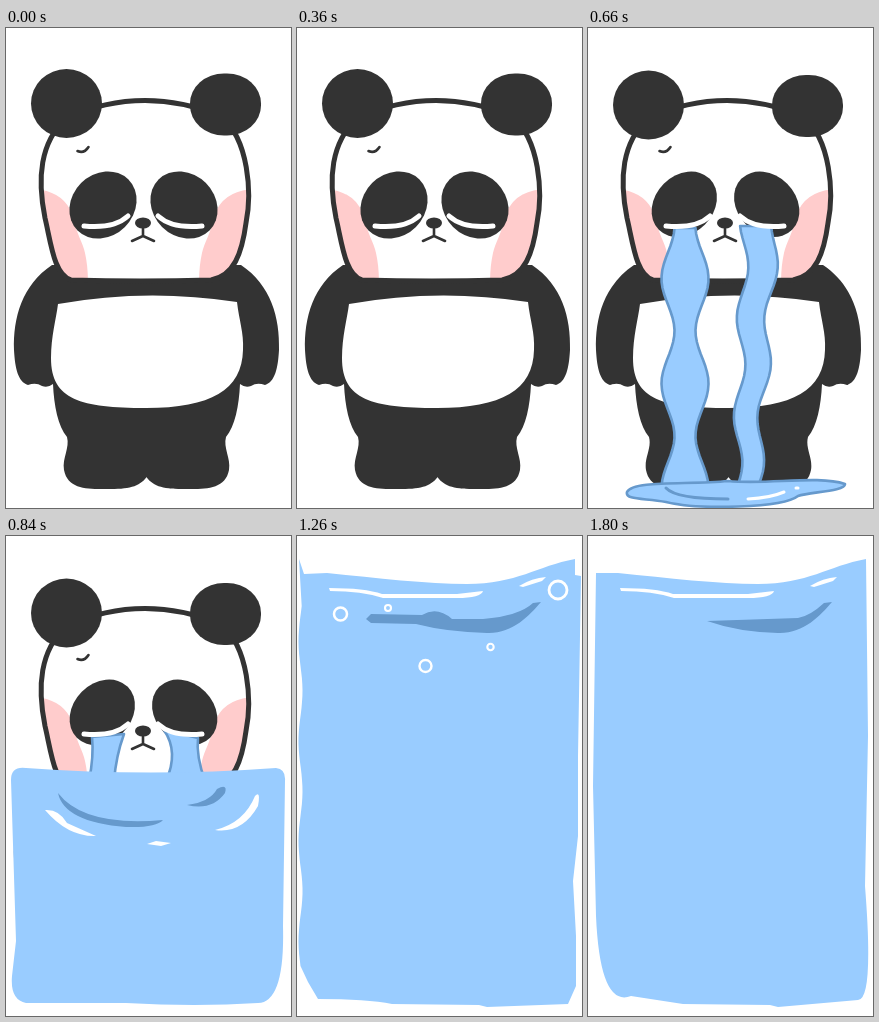
Animation of 285x480 px, one loop 1.86 s. Source, as an HTML page:

```html
<!DOCTYPE html>
<html lang="en">
<head>
<meta charset="utf-8">
<title>Crying panda</title>
<style>
  html, body { margin: 0; width: 100%; height: 100%; overflow: hidden; background: #fff; }
  svg { display: block; width: 100vw; height: 100vh; }
  .ink { fill: #333; }
  .pink { fill: #fcc; }
  .white { fill: #fff; }
  .blue { fill: #9cf; }
  .deep { fill: #69c; }
  .line { fill: none; stroke: #333; stroke-width: 2.6; stroke-linecap: round; stroke-linejoin: round; }
  .lid { fill: none; stroke: #fff; stroke-width: 5; stroke-linecap: round; }
  .wet { fill: #9cf; stroke: #69c; stroke-width: 2.6; stroke-linejoin: round; }
  .glint { fill: none; stroke: #fff; stroke-width: 3; stroke-linecap: round; }
</style>
</head>
<body>
<svg viewBox="0 0 285 480">
  <defs>
    <path id="skull" d="M60 90Q136 56 215 88C243 112 246 165 240 195C236 225 228 248 205 252Q135 254 65 252C48 247 45 215 39 190C31 150 34 115 60 90Z"/>
    <clipPath id="inHead"><use href="#skull"/></clipPath>
    <clipPath id="fall"><rect id="fallBox" width="285" height="480"/></clipPath>
    <path id="halfBody" class="ink" d="M142 237H46C16 257 7 290 8 322C9 340 12 354 22 357Q30 354 36 358Q42 360 47 356C48 378 52 398 61 409C64 420 56 430 58 442C62 463 85 461 105 461C125 461 135 458 142 447Z"/>
    <path id="cheek" class="pink" d="M30 161Q58 164 66 186C70 205 77 215 79 225Q82 238 82 256H30Z"/>
    <ellipse id="patch" class="ink" cx="97" rx="36" transform="rotate(-45 97 177)"/>
    <path id="lid" class="lid" d="M78 198Q108 201 122 188"/>
  </defs>

  <g id="panda">
    <use href="#halfBody"/>
    <use href="#halfBody" transform="translate(281) scale(-1 1)"/>
    <path class="white" d="M52 276Q140 260 231 274C233 292 238 305 237 322C236 362 205 380 140 380C75 380 45 372 45 330C45 308 50 292 52 276Z"/>
    <use href="#skull" class="white"/>
    <g clip-path="url(#inHead)">
      <use href="#cheek"/>
      <use href="#cheek" transform="translate(275) scale(-1 1)"/>
    </g>
    <use href="#skull" fill="none" stroke="#333" stroke-width="5"/>
    <g id="ears" class="ink">
      <ellipse cx="60.5" cy="75.5" rx="35.5" ry="34.5"/>
      <rect x="184" y="45.5" width="71" height="62" rx="34" ry="30"/>
    </g>
    <use href="#patch"/>
    <use href="#patch" transform="translate(275) scale(-1 1)"/>
    <path class="line" d="M71.5 123Q78 126 82.5 119M137 198V208M126 213L137 208L148 213"/>
    <ellipse class="ink" cx="137" cy="195" rx="8" ry="5.5"/>
  </g>

  <g id="tears" clip-path="url(#fall)">
    <path id="tearLeft" class="wet"/>
    <path id="tearRight" class="wet"/>
  </g>
  <g id="lids">
    <use href="#lid"/>
    <use href="#lid" transform="translate(274) scale(-1 1)"/>
  </g>

  <g id="puddle">
    <path class="wet" d="M39 464C45 452 100 457 140 453C180 457 230 447 257 456C258 463 222 464 210 468C195 480 110 482 78 474C55 470 37 472 39 464Z"/>
    <path fill="none" stroke="#69c" stroke-width="3" stroke-linecap="round" d="M78 460Q88 471 140 471"/>
    <path class="glint" d="M160 471Q182 470 196 464M208 460h2"/>
  </g>

  <g id="rising">
    <path id="pool" class="blue"/>
    <g id="ripples">
      <path class="deep" d="M52 257Q78 291 157 284Q150 292 120 291Q58 286 52 257ZM181 269Q204 266 211 253Q222 247 219 257Q206 275 181 269Z"/>
      <path class="white" d="M39 274Q53 273 61 287L90 300Q62 301 39 274ZM209 294Q238 287 249 260Q255 254 252 270Q236 298 209 294ZM141 308L150 305L165 307L155 310Z"/>
    </g>
  </g>

  <g id="full">
    <path id="sea" class="blue"/>
    <path id="shade" class="deep"/>
    <path class="white" d="M32 52Q68 52 85 58H160L186 55Q184 62 160 62H86Q65 55 33 55ZM222 50Q235 42 249 41L245 45L226 51Z"/>
    <g id="bubbles" fill="none" stroke="#fff"></g>
  </g>
</svg>
<script>
const $ = id => document.getElementById(id);
const draw = (id, d) => $(id).setAttribute('d', d);
const show = (id, on) => $(id).style.display = on ? '' : 'none';
const wave = (y, start, period) => Math.cos(2 * Math.PI * (y - start) / period);

const STEP = 60, STEPS = 31;
const CRY = 10, RISE = 12, WADE = 14, FULL = 17, BUBBLE = 19;

// Points of an edge x(y), sampled downwards or upwards.
function edge(x, from, to) {
  const points = [], dir = Math.sign(to - from);
  for (let y = from; (to - y) * dir >= 0; y += 6 * dir) points.push(`${x(y).toFixed(1)} ${y}`);
  return points.join('L');
}

function stream(top, middle, half) {
  const bottom = top + 258;
  return `M${edge(y => middle(y) - half(y), top, bottom)}L${edge(y => middle(y) + half(y), bottom, top)}Z`;
}

const tall = [
  stream(200, () => 97, y => 17 - 6.5 * wave(y, 198, 105)),
  stream(198, y => 172 - (y - 200) / 20 + 5 * wave(y, 240, 98), y => 15.5 - (y - 200) / 50)
];
const short = [
  'M86 201Q88 220 83 245H108Q110 220 118 198Z',
  'M158 194Q173 216 160 245H199Q190 220 192 202Z'
];

const pool = y => `M5 ${y + 12}Q5 ${y - 2} 20 ${y}Q145 ${y + 9} 270 ${y}Q280 ${y + 1} 279 ${y + 13}` +
  'L277 390Q279 466 252 467Q190 471 120 467H20Q4 464 6 440L10 405Z';

function sea(rough) {
  const top = 'L30 37C80 42 130 48 170 48C220 48 240 30 278 23';
  const bottom = 'L190 471L182 469L95 468';
  return rough
    ? `M2 23L7 38${top}V39L284 40L281 220V300L276 345L279 400V450L271 468${bottom}Q70 463 21 463L11 446` +
      `L${edge(y => 3.5 - 2 * wave(y, 205, 100), 430, 70)}Z`
    : `M8 37${top}L280 200L277 350Q286 464 270 464${bottom}L43 460Q12 472 8 380L5 250Z`;
}

function shade(rough) {
  const tail = rough ? 'M119 88L74 87L69 83L74 78L125 79Q140 70 155 83H186' : 'M119 85L210 82';
  return `${tail}Q222 80 236 67L244 66C232 80 215 98 190 97Q150 96 119 ${rough ? 88 : 85}Z`;
}

// x, y, radius
const bubbles = [[261, 54, 9], [43.5, 78, 6.5], [91, 72, 3], [193.5, 111, 3.2], [128.5, 130, 6]];
$('bubbles').innerHTML = bubbles.map(([x, y, r]) =>
  `<circle cx="${x}" cy="${y}" r="${r}" stroke-width="${1.7 + r / 8}"/>`).join('');

function render(step) {
  const crying = step >= CRY, full = step >= FULL;
  const weeping = crying && !full, rising = step >= RISE && !full;
  show('panda', !full);
  show('lids', !full);
  show('tears', weeping);
  show('puddle', step > CRY && step <= RISE);
  show('rising', rising);
  show('full', full);

  // The drawing sags by a hair on every third step, and while crying.
  const sag = crying || step % 3 === 2;
  $('ears').setAttribute('transform', `translate(0 ${sag ? 1.5 : 0})`);
  $('patch').setAttribute('cy', sag ? 176 : 177);
  $('patch').setAttribute('ry', sag ? 29 : 31);

  if (weeping) {
    const [left, right] = step >= WADE ? short : tall;
    draw('tearLeft', left);
    draw('tearRight', right);
    $('fallBox').setAttribute('height', step === CRY ? 330 : 480);
  }
  if (rising) {
    const lift = (WADE - step) * 70;
    draw('pool', pool(232 + lift));
    $('ripples').setAttribute('transform', `translate(0 ${lift})`);
  }
  if (full) {
    const rough = step % 2 === 1;
    draw('sea', sea(rough));
    draw('shade', shade(rough));
    show('bubbles', step >= BUBBLE);
    $('bubbles').setAttribute('transform', `translate(0 ${(21 - step) * 15.5})`);
  }
}

let last = -1;
function tick() {
  const step = Math.floor(performance.now() / STEP) % STEPS;
  if (step !== last) render(last = step);
  requestAnimationFrame(tick);
}
tick();
</script>
</body>
</html>
```
